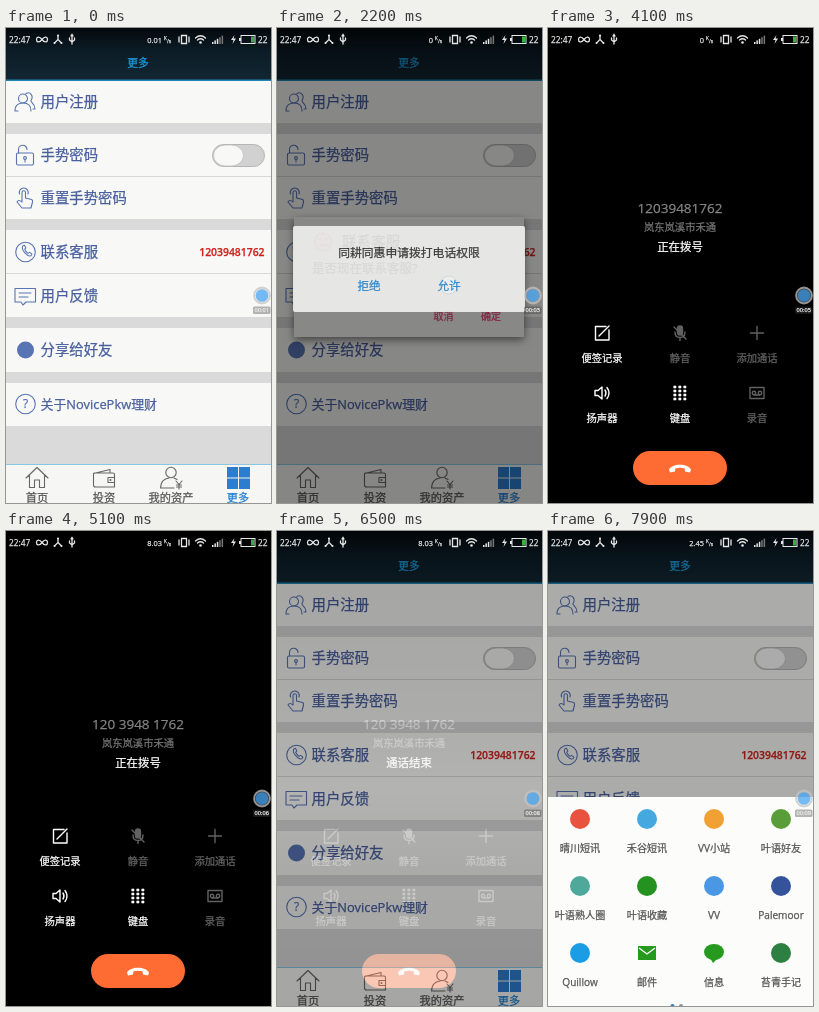
Animation of 265x475 px, one loop 8 s. Source, as an HTML page:

```html
<!DOCTYPE html>
<html lang="zh-CN">
<head>
<meta charset="utf-8">
<title>更多</title>
<style>
  html, body { margin: 0; width: 100%; height: 100%; overflow: hidden; background: #000; }
  svg { display: block; width: 265px; height: 475px; }
  text { font-family: "Open Sans", "Noto Sans CJK SC", "Noto Sans CJK", sans-serif; stroke-width: .25; }
  .line { fill: none; stroke: #5874b4; stroke-width: 1.1; stroke-linecap: round; stroke-linejoin: round; }
  .tab { stroke: #666; }
  .white { stroke: #fff; stroke-width: 1.4; }
</style>
</head>
<body>
<svg id="stage" viewBox="0 0 265 475" xmlns="http://www.w3.org/2000/svg">
  <defs>
    <linearGradient id="bar" x2="0" y2="1">
      <stop stop-color="#04090d"/><stop offset=".45" stop-color="#0c1c26"/><stop offset="1" stop-color="#122733"/>
    </linearGradient>
    <linearGradient id="veil" x2="0" y2="1">
      <stop offset=".1" stop-opacity=".98"/><stop offset=".35" stop-opacity=".92"/><stop offset=".52" stop-opacity=".83"/>
      <stop offset=".72" stop-opacity=".95"/><stop offset="1" stop-opacity=".98"/>
    </linearGradient>
    <filter id="shadow" x="-10%" y="-10%" width="120%" height="130%">
      <feDropShadow dx="0" dy="3" stdDeviation="4" flood-opacity=".5"/>
    </filter>
    <path id="handset" d="M-11 1C-8-5.500 8-5.500 11 1L10 4 5 3 4.500-.2Q0-1.500-4.500-.2L-5 3-10 4Z"/>
  </defs>
  <g id="home"></g>
  <rect id="dim" width="265" height="475"/>
  <g id="ask"></g>
  <g id="permit"></g>
  <g id="sheet"></g>
  <g id="call"></g>
  <g id="status"></g>
  <g id="recorder"></g>
</svg>
<script>
const $ = id => document.getElementById(id);
const phone = '12039481762';
const spaced = '120 3948 1762';

const rect = (x, y, w, h, fill, more = '') =>
  `<rect x="${x}" y="${y}" width="${w}" height="${h}" fill="${fill}" ${more}/>`;
const disc = (x, y, r, fill, more = '') =>
  `<circle cx="${x}" cy="${y}" r="${r}" fill="${fill}" ${more}/>`;
// y is the vertical middle of the glyphs
const text = (x, y, size, color, str, anchor = 'start', more = '') =>
  `<text x="${x}" y="${y + size * .37}" font-size="${size}" fill="${color}" stroke="${color}" text-anchor="${anchor}" ${more}>${str}</text>`;
const mid = (x, y, size, color, str, more) => text(x, y, size, color, str, 'middle', more);
const icon = (x, y, body, cls = '') =>
  `<g class="line ${cls}" transform="translate(${x} ${y})">${body}</g>`;
const path = (d, more = '') => `<path d="${d}" ${more}/>`;
const ring = (x, y, r) => `<circle cx="${x}" cy="${y}" r="${r}"/>`;

function buildHome() {
  const ink = '#485f9f';
  const cards = [[53, 42], [106, 85], [202, 87], [300, 44], [355, 43]];
  const rows = [[74, '用户注册'], [127, '手势密码'], [170, '重置手势密码'], [224, '联系客服'],
    [268, '用户反馈'], [322, '分享给好友'], [376, '关于NovicePkw理财']];
  const tabs = [[31, '首页'], [98, '投资'], [165, '我的资产'], [232, '更多']];
  let s = rect(0, 0, 265, 475, '#dadada') + rect(0, 0, 265, 52, 'url(#bar)') + rect(0, 51.5, 265, 1.5, '#1d86b4');
  s += mid(132, 35.5, 10.8, '#1e9bdc', '更多');
  for (const [y, h] of cards) s += rect(0, y, 265, h, '#f8f8f6');
  s += rect(0, 148, 265, 1, '#d8d8d8') + rect(0, 245, 265, 1, '#d8d8d8');
  for (const [y, label] of rows)
    s += text(34.5, y, label.length > 8 ? 12.9 : 14.4, ink, label, 'start', 'font-weight="500"');

  s += icon(18, 74,
    ring(-1, -3.5, 4.5) + path('M-9 9C-9 3-5 1-1 1S7 3 7 9M-9 9H-6') +
    path('M2-8.500C6-11 10-6 7-1.500 6 .5 11 1 11 7H9'));
  s += icon(18.5, 127,
    '<rect x="-8" y="-2" width="17" height="12" rx="1.5"/>' +
    path('M-6-2V-5.500A4.200 4.200 0 0 1 2.500-5.500') + ring(.5, 3, 1.4) + path('M.5 4.500V7'));
  s += icon(18.5, 170,
    path('M-2.500 4V-5.500A1.700 1.700 0 0 1 1-5.500V0L7 1.500Q8.500 2 8 4L6.500 10H-2.500L-7.500 4Q-6 1-2.500 4') +
    path('M-5-4A4.500 4.500 0 1 1 3.500-4'));
  s += icon(19.5, 224,
    ring(0, 0, 9.8) + '<use href="#handset" transform="rotate(-130) scale(.58) translate(0 2)" stroke-width="1.8"/>');
  s += icon(19, 268, path('M-10-7.500H10.500V6H1L-2 9-4 6H-10ZM-6-3H6M-6 1H3'));
  s += disc(19.5, 322, 8.5, '#5874b4');
  s += icon(19.5, 376, ring(0, 0, 9.8)) + mid(19.5, 376, 12, '#5874b4', '?');

  s += rect(206.5, 116.5, 52, 22, '#d1d1d1', 'rx="11" stroke="#b5b5b5"') +
    rect(207.5, 117, 30, 21, '#f8f8f7', 'rx="12" ry="10.500" stroke="#bdbdbd" stroke-width=".8"');
  s += text(258.5, 224, 10.4, '#cf211c', phone, 'end', 'font-weight="600"');

  s += rect(0, 436, 265, 39, '#f6f6f5') + rect(0, 436, 265, 1, '#86c7e6');
  for (const [x, label] of tabs)
    s += mid(x, 470, 11.2, label === '更多' ? '#1f7dd0' : '#555', label);
  s += icon(31, 450, path('M-11 0L0-10.500 11 0M-7.500-3V9.500H-2.500V2H2.500V9.500H7.500V-3'), 'tab');
  s += icon(98, 450, path('M-10-5H9Q10.500-5 10.500-3.500V9H-8.500Q-10.500 9-10.500 7V-4.500L6-8.500V-5M10.500-.5H4V4.500H10.500') + ring(6.5, 2, .5), 'tab');
  s += icon(165, 450, ring(0, -5.5, 5.2) + path('M-10.500 10Q-10 1-2 0M3 0L6 1.500M-10.500 10H3') +
    path('M5 3L8 6.500 11 3M8 6.500V11M5.500 7H10.500M5.500 9H10.500'), 'tab');
  for (const x of [221, 233]) for (const y of [439, 450.5]) s += rect(x, y, 11, 10.5, '#2a7dcf');
  return s;
}

function buildAsk() {
  return rect(17, 189, 230, 120, '#fbfbf9', 'filter="url(#shadow)"') +
    disc(46, 214, 8.6, '#fdf3f1', 'stroke="#e9aeac" stroke-width="1.800"') +
    disc(43, 211.5, 1.4, '#e3a19f') + disc(49, 211.5, 1.4, '#e3a19f') +
    path('M41 216H51Q46 222 41 216Z', 'fill="#e3a19f"') +
    text(65, 214, 14.6, '#333', '联系客服') +
    text(35, 240, 12.5, '#333', '是否现在联系客服?') +
    mid(166.5, 288.5, 10, '#ec3f78', '取消') + mid(214, 288.5, 10, '#ec3f78', '确定') +
    rect(17, 189, 230, 120, '#000', 'id="shade"');
}

function buildPermit() {
  return rect(16, 198, 232, 86, '#f3f3f2', 'rx="2"') +
    disc(172, 257, 9, '#fff', 'id="tap" stroke="#c9d9e4" stroke-width=".8"') +
    mid(132, 225, 11.8, '#333', '同耕同惠申请拨打电话权限') +
    mid(92, 258, 11.6, '#2289d8', '拒绝') + mid(172, 258, 11.6, '#2289d8', '允许');
}

function buildCall() {
  const cells = [
    [54, 305, '便签记录', 1, path('M4-6.500H-6.500V7H7V-3M-3 3L7-7')],
    [132, 305, '静音', 0, '<rect x="-2.500" y="-7" width="5" height="9" rx="2.500" fill="#fff"/>' + path('M-5-1Q-5 4.500 0 4.500T5-1M0 4.500V7.500M-6-6L6 6')],
    [209, 305, '添加通话', 0, path('M-6.500 0H6.500M0-6.500V6.500')],
    [54, 365, '扬声器', 1, path('M-7-2.500H-4L0-6V6L-4 2.500H-7ZM3-3Q5 0 3 3M5-5.500Q9 0 5 5.500')],
    [132, 365, '键盘', 1, [0, 1, 2, 3].map(r => [-5, 0, 5].map(x => rect(x - 1, r * 4 - 7, 2, 2, '#fff', 'stroke-width=".6"')).join('')).join('')],
    [209, 365, '录音', 0, path('M-7-5.500H7V5.500H-7ZM-3 2H3') + ring(-3, 0, 1.7) + ring(3, 0, 1.7)]
  ];
  let s = rect(0, 22, 265, 453, 'url(#veil)') + rect(0, 0, 265, 22, '#000') + '<rect id="black" width="265" height="475"/>';
  s += '<g id="caller">' + mid(132, 180, 13.5, '#868686', phone, 'id="number"') +
    mid(132, 199, 10.3, '#747474', '岚东岚溪市禾通') + mid(132, 218.5, 11.4, '#fff', '正在拨号', 'id="state"') + '</g>';
  for (const [x, y, label, on, art] of cells)
    s += `<g class="${on ? 'on' : ''}" opacity=".38">` + icon(x, y, art, 'white') + mid(x, y + 25, 10.3, '#fff', label) + '</g>';
  return s + rect(85, 423, 94, 34, '#ff6c33', 'rx="17"') +
    '<use href="#handset" transform="translate(132 440.500)" fill="#fff"/>';
}

function buildSheet() {
  const items = [['晴川短讯', '#e9523f'], ['禾谷短讯', '#45a9df'], ['VV小站', '#f1a033'], ['叶语好友', '#589d38'],
    ['叶语熟人圈', '#4fa99b'], ['叶语收藏', '#24921f'], ['VV', '#4a97e4'], ['Palemoor', '#34539b'],
    ['Quillow', '#1b9de6'], ['邮件', '#269a1e'], ['信息', '#269a1e'], ['苔青手记', '#2d7f42']];
  let s = rect(0, 266, 265, 215, '#fcfcfb');
  items.forEach(([label, color], i) => {
    const x = 32 + i % 4 * 67, y = 288 + (i >> 2) * 67;
    if (label === '邮件')
      s += rect(x - 9, y - 7, 18, 14, color) + path(`M${x - 8} ${y - 5}l8 6 8-6`, 'fill="none" stroke="#fff" stroke-width="1.200"');
    else if (label === '信息')
      s += `<ellipse cx="${x}" cy="${y - 1}" rx="10" ry="8" fill="${color}"/>` + path(`M${x - 4} ${y + 5}l3 5 5-5z`, `fill="${color}"`);
    else s += disc(x, y, 10, color);
    s += mid(x, y + 29.5, 10.1, '#555', label);
  });
  return s + disc(124.5, 475, 2, '#3d78b8') + disc(133, 475, 2, '#8a9199');
}

function buildStatus() {
  const w = '#e6e6e6';
  const white = 'fill="none" stroke="#e6e6e6" stroke-width="1.300" stroke-linecap="round"';
  let s = text(3, 11.5, 8.3, w, '22:47') +
    path('M36 11.500C33 7.500 30.500 9 30.500 11.500S33 15.500 36 11.500 41.500 9 41.500 11.500 39 15.500 36 11.500', white) +
    path('M52 7.500V11.500L48.500 15M52 11.500L55.500 15', white) + disc(52, 7.5, 1, w) + disc(48.5, 15, 1, w) + disc(55.5, 15, 1, w) +
    path('M66 7V16M63.500 10V12L66 14 68.500 12V10M65 8L66 6.500 67 8', white);
  s += text(156, 12, 7.4, w, '', 'end', 'id="speed"') + text(158, 9.8, 4.6, w, 'K') + text(161, 13, 5, w, '/s');
  s += path('M175.500 7.500H180.500V15.500H175.500ZM173 9V14M183 9V14', white) +
    path('M189.500 10Q194.500 5.500 199.500 10M191.500 12Q194.500 9.500 197.500 12', white) + disc(194.5, 14.5, 1.3, w);
  for (let i = 0; i < 5; i++) s += rect(206 + i * 2.4, 14 - i * 1.6, 1.5, 2 + i * 1.6, i < 3 ? w : '#777');
  s += path('M228.500 7L225 12H227.500L226.500 16 230 10.500H227.500Z', `fill="${w}"`) +
    rect(235, 7.5, 14, 8, 'none', `stroke="${w}"`) + rect(233, 10, 2, 3, w) + rect(245, 8.5, 3, 6, '#35b13d') +
    text(252, 11.5, 8.2, w, '22');
  return s;
}

function buildRecorder() {
  return disc(256, 267.5, 8, 'rgba(200,200,200,.35)', 'stroke="rgba(195,195,195,.7)" stroke-width="1.800"') +
    disc(256, 267.5, 6.3, 'rgba(50,160,250,.64)') +
    rect(247, 278.5, 17.5, 7.5, 'rgba(60,60,60,.38)', 'rx="1.500"') +
    mid(255.7, 282, 5.6, '#eee', '', 'id="clock" stroke-width="0"');
}

$('home').innerHTML = buildHome();
$('ask').innerHTML = buildAsk();
$('permit').innerHTML = buildPermit();
$('call').innerHTML = buildCall();
$('sheet').innerHTML = buildSheet();
$('status').innerHTML = buildStatus();
$('recorder').innerHTML = buildRecorder();

// Linear track through time/value pairs
function track(t, ...k) {
  if (t <= k[0]) return k[1];
  for (let i = 2; i < k.length; i += 2)
    if (t <= k[i]) return k[i - 1] + (k[i + 1] - k[i - 1]) * (t - k[i - 2]) / (k[i] - k[i - 2]);
  return k[k.length - 1];
}
const put = (id, str) => { if ($(id).textContent !== str) $(id).textContent = str; };
const fade = (id, v) => {
  $(id).setAttribute('opacity', v);
  $(id).style.display = v > 0 ? '' : 'none';
};
const grow = (id, y, k) =>
  $(id).setAttribute('transform', `translate(132 ${y}) scale(${k}) translate(-132 ${-y})`);
const lit = document.querySelectorAll('.on');

function draw(t) {
  fade('dim', track(t, 200, 0, 800, .56, 2000, .56, 2200, .46, 2500, 0, 7600, 0, 7900, .31));
  fade('ask', track(t, 300, 0, 700, 1, 2200, 1, 2500, 0));
  grow('ask', 249, track(t, 300, .92, 700, 1));
  fade('shade', track(t, 1200, 0, 1700, .56, 2000, .56, 2200, .46));
  fade('permit', track(t, 1200, 0, 1700, 1, 2000, 1, 2200, .88, 2500, 0));
  grow('permit', 241, track(t, 1200, .94, 1700, 1));
  fade('tap', track(t, 1900, 0, 2000, .8));

  fade('call', t < 4100 ? 0 : track(t, 6300, 1, 6600, 0));
  fade('black', track(t, 6100, 1, 6300, 0));
  $('caller').setAttribute('transform', `translate(0 ${track(t, 4100, 0, 4400, 13.3)})`);
  put('number', t < 5100 ? phone : spaced);
  put('state', t < 5700 ? '正在拨号' : '通话结束');
  const glow = track(t, 5600, 1, 6000, .4);
  lit.forEach(g => g.setAttribute('opacity', glow));

  fade('sheet', t < 7700 ? 0 : 1);
  $('sheet').setAttribute('transform', `translate(0 ${track(t, 7700, 135, 7800, 55, 7900, 0)})`);

  put('speed', t < 2000 ? '0.01' : t < 4800 ? '0' : t < 7700 ? '8.03' : '2.45');
  put('clock', '00:0' + (1 + Math.floor((t + 100) / 900)));
}

function tick() {
  draw(Math.floor(performance.now() % 8000 / 100) * 100);
  requestAnimationFrame(tick);
}
tick();
</script>
</body>
</html>
```
